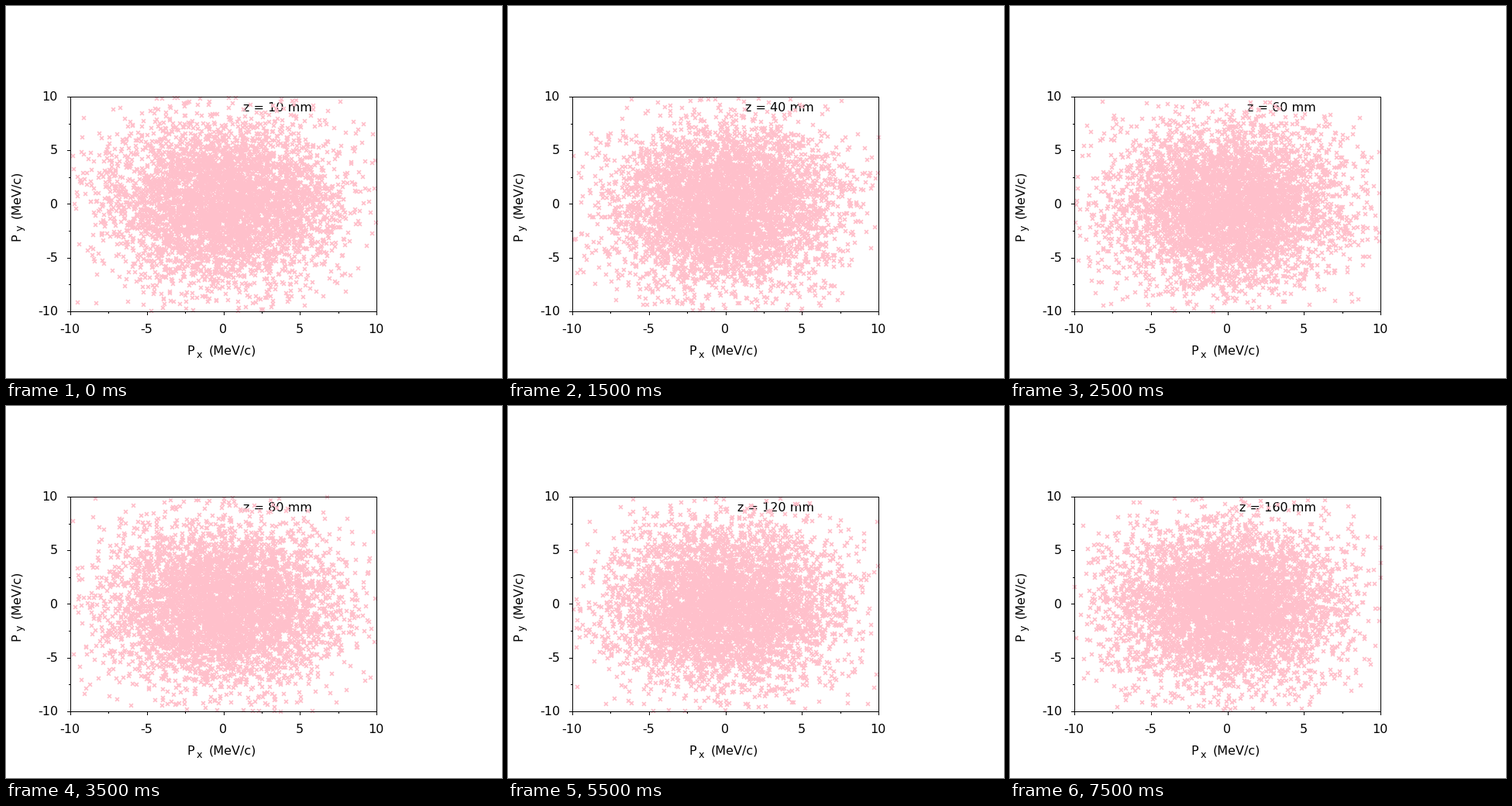
Animation of 640 by 480 pixels, one loop 8000 ms. Source, as a matplotlib script:

```python
import matplotlib.pyplot as plt
import numpy as np
from matplotlib.animation import FuncAnimation

W, H, DPI = 640, 480, 80
PX = 72 / DPI                                # points per pixel
LEFT, RIGHT, TOP, BOTTOM = 83.5, 478.5, 117.5, 394.5
LIMIT, SIGMA, COUNT = 10, 3.8, 5000
FRAMES, INTERVAL = 16, 500

plt.rcParams["font.family"] = "DejaVu Sans"

fig = plt.figure(figsize=(W / DPI, H / DPI), dpi=DPI, facecolor="white")
ax = fig.add_axes([0, 0, 1, 1])
ax.axis("off")


def to_x(p):
    return LEFT + (p + LIMIT) / (2 * LIMIT) * (RIGHT - LEFT)


def to_y(p):
    return BOTTOM - (p + LIMIT) / (2 * LIMIT) * (BOTTOM - TOP)


def label(x, y, text, size=16, **kw):
    return ax.text(x, y, text, fontsize=size * PX, va="baseline",
                   color="black", **kw)


def line(xs, ys):
    ax.plot(xs, ys, color="black", lw=PX, zorder=5, snap=False,
            solid_capstyle="projecting", solid_joinstyle="miter")


def draw_axes():
    line([LEFT, RIGHT, RIGHT, LEFT, LEFT], [TOP, TOP, BOTTOM, BOTTOM, TOP])
    for p in np.arange(-LIMIT, LIMIT + 1, 2.5):
        x = np.floor(to_x(p)) + 0.5
        y = np.ceil(to_y(p)) - 0.5
        major = p % 5 == 0
        size = 4 if major else 2
        line([x, x], [BOTTOM, BOTTOM + size])
        line([LEFT - size, LEFT], [y, y])
        if major:
            label(x - 1, 422, f"{p:.0f}", ha="center")
            label(67, np.floor(to_y(p)) + 5, f"{p:.0f}", ha="right")


def draw_titles():
    cx, cy = 281, 255
    parts = [("P", -48, 0, 16), ("{}", -35, 4, 12.8), ("(MeV/c)", -19, 0, 16)]
    for text, along, drop, size in parts:
        label(cx + along, 450 + drop, text.format("x"), size)
        label(18 + drop, cy - along, text.format("y"), size,
              rotation=90, rotation_mode="anchor")


draw_axes()
draw_titles()
depth = label(395, 136, "", ha="right", zorder=2)
cloud = ax.scatter([], [], marker="x", color="pink", s=(4.8 * PX) ** 2,
                   linewidths=1.8 * PX, snap=False, zorder=3)
ax.set_xlim(0, W)
ax.set_ylim(H, 0)


def update(i):
    rng = np.random.default_rng(100 + i)
    px, py = rng.normal(0, SIGMA, (2, COUNT))
    inside = (abs(px) <= LIMIT) & (abs(py) <= LIMIT)
    x, y = to_x(px[inside]), to_y(py[inside])
    cloud.set_offsets(np.column_stack([np.floor(x), np.floor(y)]))
    depth.set_text(f"z = {10 * (i + 1)} mm")
    return cloud, depth


anim = FuncAnimation(fig, update, frames=FRAMES, interval=INTERVAL,
                     repeat=True, repeat_delay=0, blit=False)
plt.show()
```
